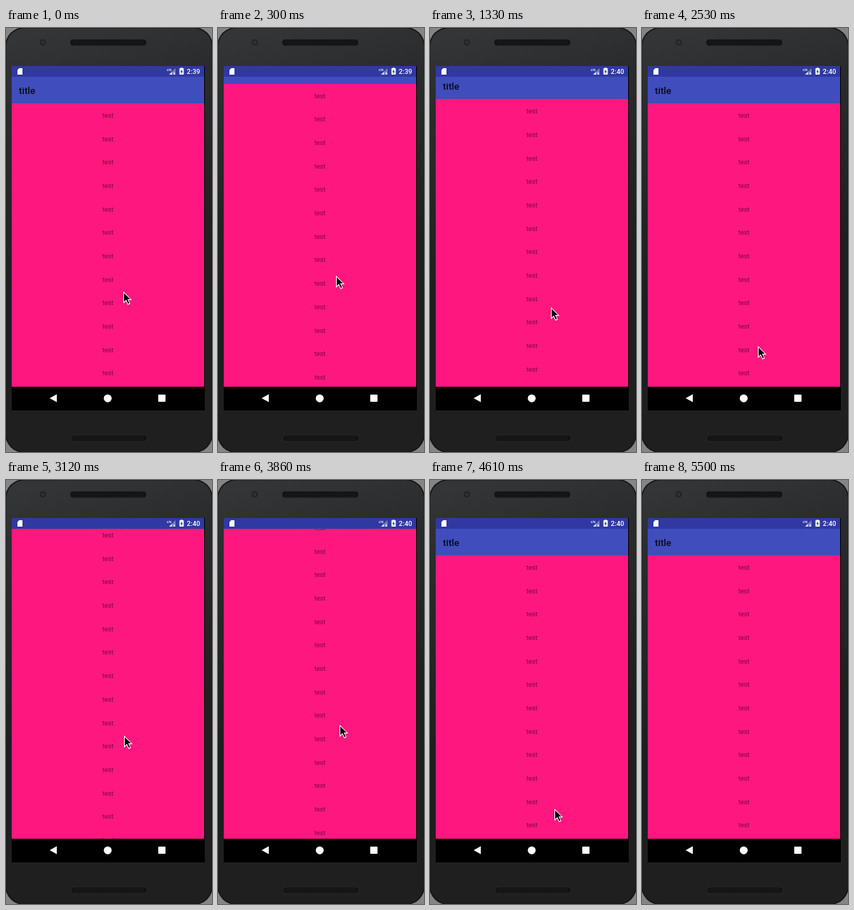
An HTML page with a canvas that plays this animation: 288x591 px, repeating every 6420 ms.

```html
<!DOCTYPE html>
<html lang="en">
<head>
<meta charset="utf-8">
<style>
html, body { margin: 0; width: 288px; height: 591px; overflow: hidden; background: #1e1e1e; }
canvas { display: block; }
</style>
</head>
<body>
<canvas id="stage" width="288" height="591"></canvas>
<script>
const ctx = document.getElementById('stage').getContext('2d');
const LOOP = 6420, STEP = 148.7, ROW = 32.68, BAR = 37;
const REST = 12, RESUME = 17, EXIT = 37;

// Each swipe scrolls the list and pulls the pointer up, then back down.
const SWIPES = [
  { start: 1, length: 8.205, scroll: 73, reach: 74.4 },
  { start: 18, length: 12, scroll: 63.5, reach: 129 }
];

// Slow pointer drift below the swipes: step, x, y
const DRIFT = [
  [0, 164, 367], [9, 169, 395], [REST, 167, 470], [RESUME, 162, 443],
  [31, 174, 458], [33, 176, 478], [EXIT, 252, 611]
];

function drift(step) {
  const i = Math.max(1, DRIFT.findIndex(k => k[0] >= step));
  const [a, b] = [DRIFT[i - 1], DRIFT[i]];
  const p = (step - a[0]) / (b[0] - a[0]);
  return [a[1] + (b[1] - a[1]) * p, a[2] + (b[2] - a[2]) * p];
}

function swiped(step, key) {
  return SWIPES.reduce((sum, s) => {
    const p = Math.min(1, Math.max(0, (step - s.start) / s.length));
    return sum + s[key] * Math.sin(Math.PI * p);
  }, 0);
}

function rect(color, x, y, w, h) {
  ctx.fillStyle = color;
  ctx.fillRect(x, y, w, h);
}

function poly(color, points) {
  ctx.fillStyle = color;
  ctx.beginPath();
  points.forEach(p => ctx.lineTo(...p));
  ctx.closePath();
  ctx.fill();
}

function round(color, x, y, w, h, r) {
  ctx.fillStyle = color;
  ctx.beginPath();
  ctx.roundRect(x, y, w, h, r);
  ctx.fill();
}

function text(str, x, y, font, color, align = 'left') {
  ctx.font = font + ' Roboto, sans-serif';
  ctx.fillStyle = color;
  ctx.textAlign = align;
  ctx.fillText(str, x, y);
}

function speaker(x, y) {
  round('#2f3031', x - 0.5, y - 0.5, 107, 9.5, 4);
  round('#131313', x, y, 106, 8.5, 4);
  for (let r = 0; r < 3; r++)
    for (let c = 0; c < 33; c++) rect('#202020', x + 4 + c * 3, y + 1.5 + r * 2.5, 1.5, 1);
}

function phone() {
  rect('#858585', 0, 0, 288, 591);
  const body = ctx.createLinearGradient(80, 0, 160, 330);
  body.addColorStop(0, '#343537');
  body.addColorStop(0.3, '#2a2b2c');
  body.addColorStop(1, '#1f1f1f');
  round('#151515', -1, -1, 290, 593, 26);
  round(body, 0.5, 0.5, 287, 590, 25);
  speaker(90, 16);
  speaker(91, 567.5);
  round('#232527', 47, 15.5, 9, 9, 4.5);
  round('#33363a', 49.5, 18, 4, 4, 2);
}

function statusBar(clock) {
  rect('#3039a2', 8, 53, 269, 15);
  poly('#fff', [[18.5, 56], [23, 56], [23, 65], [16, 65], [16, 58.5]]);
  text('LTE', 225, 59.5, 'bold 4px', '#fff');
  poly('#777fc2', [[237, 56], [237, 65], [228, 65]]);
  poly('#dde', [[232, 61], [232, 65], [228, 65]]);
  text('x', 234, 65, 'bold 5px', '#fff');
  rect('#fff', 244, 55.5, 3, 1);
  round('#fff', 242.5, 56, 6, 9, 0.7);
  poly('#3039a2', [[246, 57.5], [243.6, 61.3], [245.2, 61.3], [245, 64], [247.4, 60.2], [245.8, 60.2]]);
  text(clock, 271.3, 64.2, '500 9.4px', '#fff', 'right');
}

function screen(offset, clock) {
  rect('#000', 8, 53, 270, 480);
  ctx.save();
  ctx.beginPath();
  ctx.rect(8, 68, 269, 432);
  ctx.clip();
  rect('#ff1780', 8, 68, 269, 432);
  for (let i = 0; i < 16; i++)
    text('test', 142.5, 125 + i * ROW - offset, '9.2px', 'rgba(0,0,0,.54)', 'center');
  if (offset < BAR) {
    rect('#404dbc', 8, 68, 269, Math.round(BAR - offset));
    text('title', 18, 91.6 - offset, '500 13.4px', 'rgba(0,0,0,.87)');
  }
  ctx.restore();
  statusBar(clock);
  poly('#fff', [[61, 516], [71, 510.5], [71, 521.5]]);
  round('#fff', 136.7, 510.7, 11, 11, 5.5);
  round('#fff', 212.8, 511, 10.2, 10, 0.8);
}

function pointer(x, y) {
  ctx.save();
  ctx.translate(Math.round(x), Math.round(y));
  poly('#fff', [[0, 0], [0, 17], [3.8, 13.6], [6.3, 19], [9.7, 17.5], [7.3, 12.2], [12.2, 12.2]]);
  poly('#000', [[1, 2.4], [1, 14.6], [4.1, 11.7], [6.8, 17.5], [8.4, 16.8], [5.8, 11.1], [9.8, 11.1]]);
  ctx.restore();
}

function draw(now) {
  let step = Math.floor((now % LOOP + 12) / STEP);
  if (step > REST && step < RESUME) step = REST;
  phone();
  screen(swiped(step, 'scroll'), step < 3 ? '2:39' : '2:40');
  if (step < EXIT) {
    const [x, y] = drift(step);
    pointer(x, y - swiped(step, 'reach'));
  }
}

let start;
function tick(now) {
  start ??= now;
  draw(now - start);
  requestAnimationFrame(tick);
}
requestAnimationFrame(tick);
</script>
</body>
</html>
```
